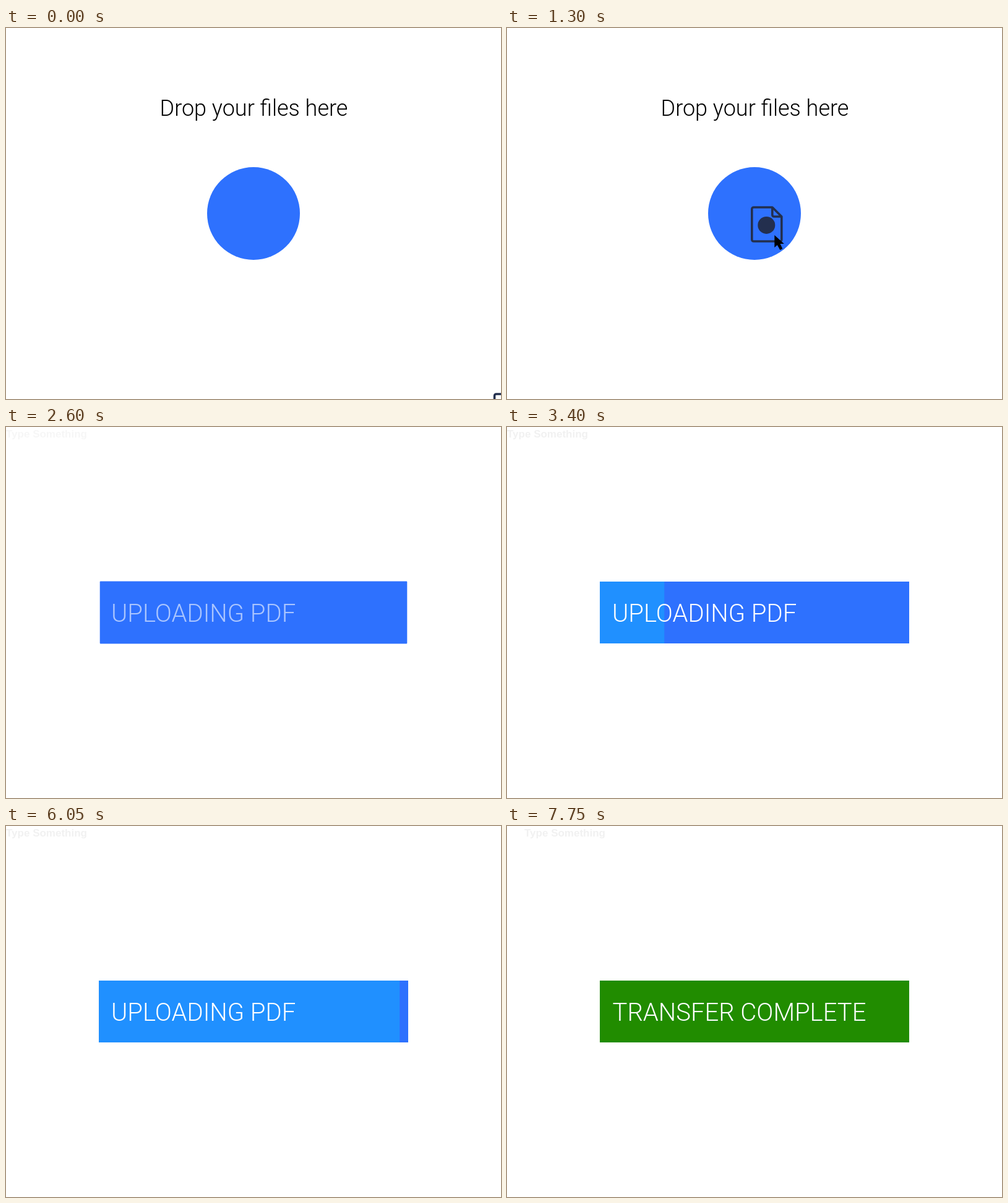
Animation of 800x600 px, one loop 8000 ms. Source, as an HTML page:

```html
<!DOCTYPE html>
<html lang="en">
<head>
<meta charset="utf-8">
<title>File upload</title>
<style>
  html, body { margin: 0; width: 100%; height: 100%; overflow: hidden; background: #fff; }
  svg { display: block; width: 100%; height: 100%; }
  text { font-family: Roboto, sans-serif; font-weight: 300; }
  .label { font-size: 40px; fill: #fff; }
  #hint { font: bold 17px "Liberation Sans", Arial, sans-serif; fill: #f1f1f1; }
</style>
</head>
<body>
<svg viewBox="0 0 800 600">
  <text id="hint" y="17">Type Something</text>
  <text id="title" x="400.5" y="142" font-size="36" text-anchor="middle">Drop your files here</text>
  <rect id="shape" fill="#2e71fe"/>
  <rect id="bar" x="150" y="250" height="100"/>
  <text id="uploading" class="label" x="170" y="314.5">UPLOADING PDF</text>
  <text id="complete" class="label" x="170.5" y="314.5">TRANSFER COMPLETE</text>
  <g id="file">
    <g fill="none" stroke="#232f4e" stroke-width="3.6" stroke-linejoin="round">
      <path d="M5 2H35L50 17V54Q50 57 47 57H5Q2 57 2 54V5Q2 2 5 2Z"/>
      <path d="M35 2V14Q35 17 38 17H50"/>
    </g>
    <circle cx="25.5" cy="31" r="14" fill="#232f4e"/>
    <path d="M38.5 47V67L43 63L47.5 71L51.5 69L47.7 61H54Z"/>
  </g>
</svg>
<script>
const LOOP = 8000;
const el = id => document.getElementById(id);
const set = (id, attrs) => {
  for (const k in attrs) el(id).setAttribute(k, attrs[k]);
};
const lerp = (a, b, p) => a + (b - a) * p;
const span = (t, start, length) => Math.min(1, Math.max(0, (t - start) / length));

function bezier(x1, y1, x2, y2) {
  const at = (a, b, u) => 3 * a * u * (1 - u) ** 2 + 3 * b * u * u * (1 - u) + u ** 3;
  return x => {
    if (x <= 0 || x >= 1) return x <= 0 ? 0 : 1;
    let lo = 0, hi = 1;
    for (let i = 0; i < 24; i++) {
      const mid = (lo + hi) / 2;
      if (at(x1, x2, mid) < x) lo = mid; else hi = mid;
    }
    return at(y1, y2, lo);
  };
}
const ease = bezier(.25, .1, .25, 1);
const drag = bezier(.2, 0, .5, 1);
const upload = bezier(.166, .1, .293, 1);

// Damped spring from 0 to 1 with one visible overshoot
function spring(t) {
  if (t <= 0) return 0;
  const decay = 5.8, w = 10, s = t / 1000;
  return 1 - Math.exp(-decay * s) * (Math.cos(w * s) + decay / w * Math.sin(w * s));
}

function mix(from, to, p) {
  return `rgb(${from.map((v, i) => Math.round(lerp(v, to[i], p)))})`;
}

function draw(t) {
  const move = drag(span(t, 0, 1600));
  set("file", {
    transform: `translate(${lerp(787.5, 374.3, move)} ${lerp(590, 273, move)})`,
    opacity: 1 - ease(span(t, 1400, 300))
  });
  set("title", { opacity: 1 - ease(span(t, 1350, 290)) });

  const size = 150 + 50 * spring(t - 1400);
  const morph = ease(span(t, 2212, 452));
  const w = lerp(size, 500, morph), h = lerp(size, 100, morph);
  set("shape", {
    x: 400 - w / 2, y: 300 - h / 2, width: w, height: h,
    rx: Math.min(w / 2, h / 2, lerp(97, 0, morph))
  });

  const done = ease(span(t, 6980, 470));
  set("bar", {
    width: 500 * upload(span(t, 2876, 3989)),
    fill: mix([32, 144, 255], [33, 140, 0], done)
  });
  set("uploading", { opacity: ease(span(t, 2480, 350)) * (1 - ease(span(t, 6980, 350))) });
  set("complete", { opacity: ease(span(t, 7330, 400)) });
  set("hint", { x: lerp(0, 28, done), opacity: ease(span(t, 2480, 350)) });
}

const begin = performance.now();
function tick() {
  draw((performance.now() - begin) % LOOP);
  requestAnimationFrame(tick);
}
draw(0);
requestAnimationFrame(tick);
</script>
</body>
</html>
```
